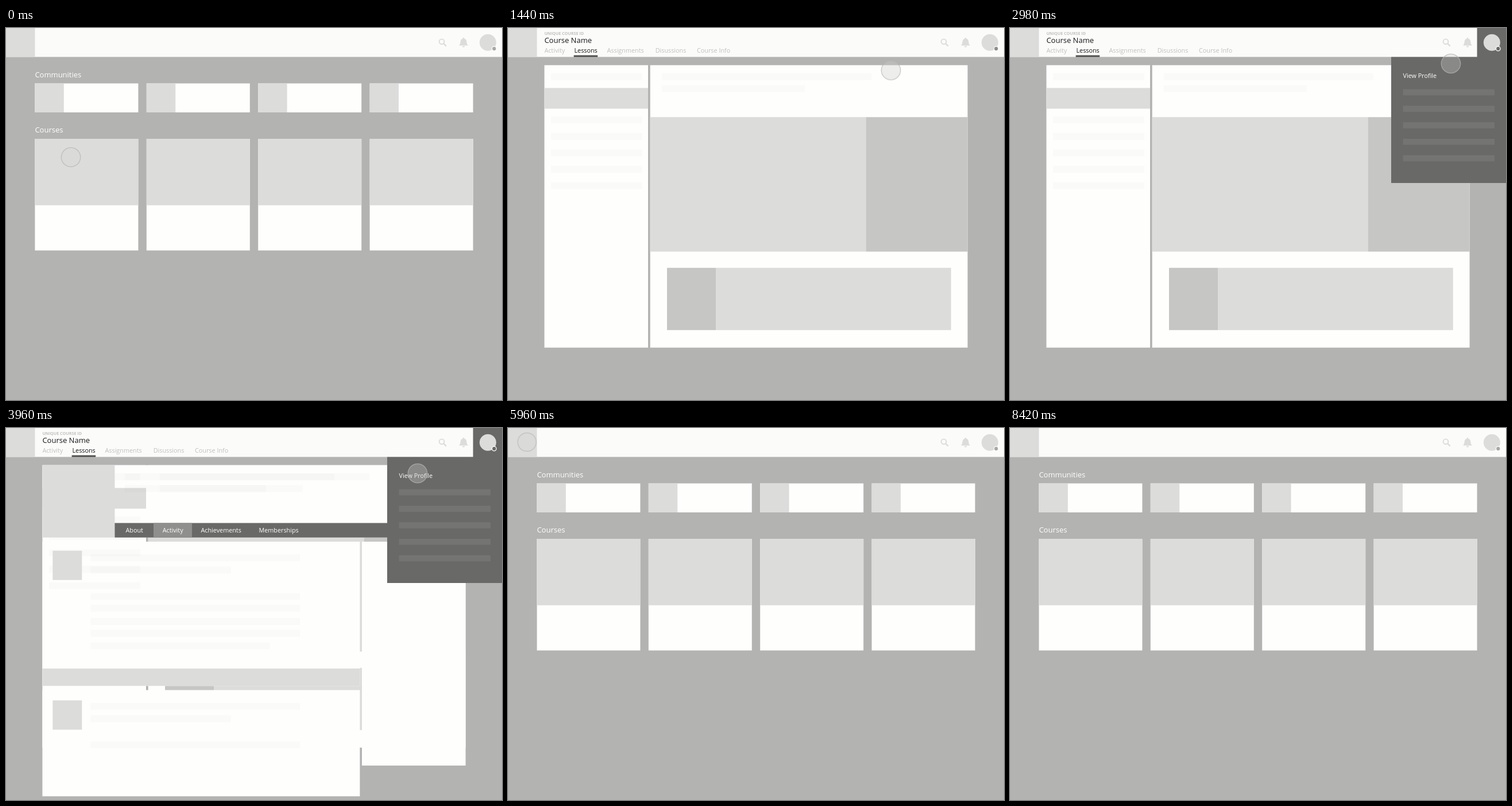
Write an HTML page that moves like this. It is 864x648 px and loops after 8.7 s.

```html
<!DOCTYPE html>
<html lang="en">
<head>
<meta charset="utf-8">
<title>Course navigation wireframe</title>
<style>
  html, body { margin: 0; width: 100%; height: 100%; overflow: hidden; background: #b3b3b2; }
  svg { display: block; width: 864px; height: 648px; }
  text { font: 10.8px "Open Sans", sans-serif; }
  .heading { font-size: 13px; }
  .code { font-size: 7.2px; font-weight: 700; }
  .white { fill: #fefefd; }
  .light { fill: #dcdcdb; }
  .mid { fill: #c6c6c5; }
  .dark { fill: #696967; }
  .lines { fill: none; stroke: #000; stroke-opacity: .014; stroke-width: 12; }

  .home, .course, .profile, .title, .dot { animation: 8.7s step-end infinite; }
  .home { animation-name: home; }
  .course { animation-name: course; }
  .profile { animation-name: profile; }
  .title { animation-name: title; }
  .dot { animation-name: dot; }
  .menu { animation: menu 8.7s linear infinite; }
  .move-x { animation: move-x 8.7s infinite; }
  .move-y { animation: move-y 8.7s infinite; }
  .press { animation: press 8.7s ease-in-out infinite; }
  .tint { animation: tint 8.7s linear infinite; }

  @keyframes home {
    0%, 68.448% { visibility: visible; }
    8.276% { visibility: hidden; }
    100% { visibility: visible; }
  }
  @keyframes course {
    0%, 45.69%, 100% { visibility: hidden; }
    8.276% { visibility: visible; }
  }
  @keyframes profile {
    0%, 68.448%, 100% { visibility: hidden; }
    45.46% { visibility: visible; }
  }
  @keyframes title {
    0%, 68.448%, 100% { visibility: hidden; }
    8.276% { visibility: visible; }
  }
  @keyframes dot {
    0%, 68.448%, 100% { fill: #a8a8a7; }
    8.276%, 45.862% { fill: #8d8d8c; }
    27.586% { fill: #696967; }
  }
  @keyframes menu {
    0%, 27.586% { opacity: 0; }
    29.425%, 45.861% { opacity: 1; }
    45.862%, 100% { opacity: 0; }
  }
  @keyframes move-x {
    0% { transform: translateX(113px); animation-timing-function: ease-out; }
    4.828%, 8.621% { transform: translateX(114px); }
    25.747%, 31.724% { transform: translateX(838px); }
    39.31% { transform: translateX(717px); }
    51.034% { transform: translateX(717px); animation-timing-function: cubic-bezier(.25, .2, .2, 1); }
    66.437%, 100% { transform: translateX(33px); }
  }
  @keyframes move-y {
    0% { transform: translateY(225px); animation-timing-function: ease-out; }
    4.828%, 8.621% { transform: translateY(231px); }
    25.747% { transform: translateY(25px); }
    31.724% { transform: translateY(25px); animation-timing-function: cubic-bezier(.25, .4, .25, 1); }
    39.31%, 51.034% { transform: translateY(79px); }
    59.77% { transform: translateY(22px); }
    66.437% { transform: translateY(24.5px); }
    72.184% { transform: translateY(24.5px); animation-timing-function: ease-in; }
    75.632%, 100% { transform: translateY(-20px); }
  }
  @keyframes press {
    0%, 6.437%, 8.276%, 26.667%, 28.506%, 41.379%, 43.218%, 68.276%, 69.655%, 100% { transform: scale(1); }
    7.356%, 27.586%, 42.299%, 68.966% { transform: scale(.86); }
  }
  @keyframes tint {
    0%, 6.437% { fill-opacity: .08; }
    8.276%, 45.862% { fill-opacity: .33; }
    51.034%, 100% { fill-opacity: .08; }
  }
</style>
</head>
<body>
<svg viewBox="0 0 864 648">
  <defs>
    <g id="column">
      <path class="white" d="M50.4 96.5h180v50.4h-180zM50.4 193h180v194.4h-180z"/>
      <path class="light" d="M50.4 96.5h50.4v50.4h-50.4zM50.4 193h180v115.8h-180z"/>
    </g>
  </defs>
  <rect width="864" height="648" fill="#b3b3b2"/>

  <g class="home">
    <use href="#column"/>
    <use href="#column" x="194.4"/>
    <use href="#column" x="388.8"/>
    <use href="#column" x="583.2"/>
    <g class="white">
      <text class="heading" x="50.4" y="86">Communities</text>
      <text class="heading" x="50.4" y="182">Courses</text>
    </g>
  </g>

  <g class="course">
    <path class="white" d="M63.4 64.8H244V556.8H63.4zM247.7 64.8H800.6V556.8H247.7z"/>
    <path class="light" d="M247.7 155.3H623.5V389.4H247.7zM362 417.8H771.8V526.3H362z"/>
    <path class="mid" d="M623.5 155.3H800.6V389.4H623.5zM277 417.8H362V526.3H277z"/>
  </g>

  <!-- Cards sit below the lesson rows while the two pages overlap. -->
  <path class="profile white" d="M63.4 64.8H800.6V190.8H63.4zM63.4 198H616.4V449.3H63.4zM63.4 456.6H616.4V641.5H63.4zM620 198H800.6V588H620z"/>

  <g class="course">
    <path class="light" d="M63.4 104.4H244V140.4H63.4z"/>
    <path class="lines" d="M75 85H234M75 160H234M75 189H234M75 217.5H234M75 246H234M75 274.5H234M268 85H633M268 105.5H517"/>
  </g>

  <g class="profile">
    <path class="light" d="M63.4 64.8h126v126h-126zM63.4 419H616.4V449.3H63.4zM81.3 213.8h51v51h-51zM81.3 474.5h51v51h-51z"/>
    <path class="lines" d="M207 85H572M207 105.5H453M147 226H512M147 247.5H392M147 293.5H512M147 314H512M147 337H512M147 357.5H512M147 379.5H460M147 485H512M147 506.5H392M147 552H512"/>
    <path class="dark" d="M189.4 165.6H800.6V190.8H189.4z"/>
    <path fill="#8f8f8e" d="M257 165.6H324V190.8H257z"/>
    <g class="white">
      <text x="208.5" y="181.5">About</text>
      <text x="272.7" y="181.5">Activity</text>
      <text x="339.5" y="181.5">Achievements</text>
      <text x="440.5" y="181.5">Memberships</text>
    </g>
  </g>

  <rect width="864" height="50.4" fill="#fbfbfa"/>
  <rect class="light" width="50.4" height="50.4"/>
  <g class="title" fill="#c0c0bf">
    <text class="code" x="63.4" y="12.2">UNIQUE COURSE ID</text>
    <text class="heading" x="63.4" y="26.4" fill="#161616">Course Name</text>
    <text x="63.4" y="43.4">Activity</text>
    <text x="115.5" y="43.4" fill="#161616">Lessons</text>
    <text x="172.5" y="43.4">Assignments</text>
    <text x="256.7" y="43.4">Disussions</text>
    <text x="329" y="43.4">Course Info</text>
    <path fill="#4d4d4c" d="M114.6 47.4H156.2V50.4H114.6z"/>
  </g>
  <g fill="none" stroke="#dcdcdb">
    <circle cx="759" cy="23.8" r="4.4" stroke-width="1.9"/>
    <path d="M762.3 27.2L766.8 31.7" stroke-width="2.4"/>
  </g>
  <path class="light" d="M789 30.4Q791.6 28.5 791.6 24.5Q791.6 19.7 795.8 18.6V18a1.2 1.2 0 0 1 2.4 0V18.6Q802.4 19.7 802.4 24.5Q802.4 28.5 805 30.4zM794.8 31.4H799.2A2.2 2.2 0 0 1 794.8 31.4z"/>

  <g class="menu">
    <path class="dark" d="M813.6 0H864V270H664V50.4H813.6z"/>
    <path fill="none" stroke="#747473" stroke-width="10.6" d="M684.5 112H844M684.5 140.8H844M684.5 169.5H844M684.5 198.3H844M684.5 227H844"/>
    <text class="white" x="684.5" y="87.2">View Profile</text>
  </g>
  <circle class="light" cx="839.4" cy="25.2" r="14.5"/>
  <circle class="dot" cx="850.3" cy="36" r="3.8" stroke="#fefefd" stroke-width="1.3"/>

  <g class="move-x"><g class="move-y"><g class="press">
    <circle class="tint" r="16.7" fill="#ccccca" stroke="#b4b4b2" stroke-opacity=".75" stroke-width="1.3"/>
  </g></g></g>
</svg>
</body>
</html>
```
